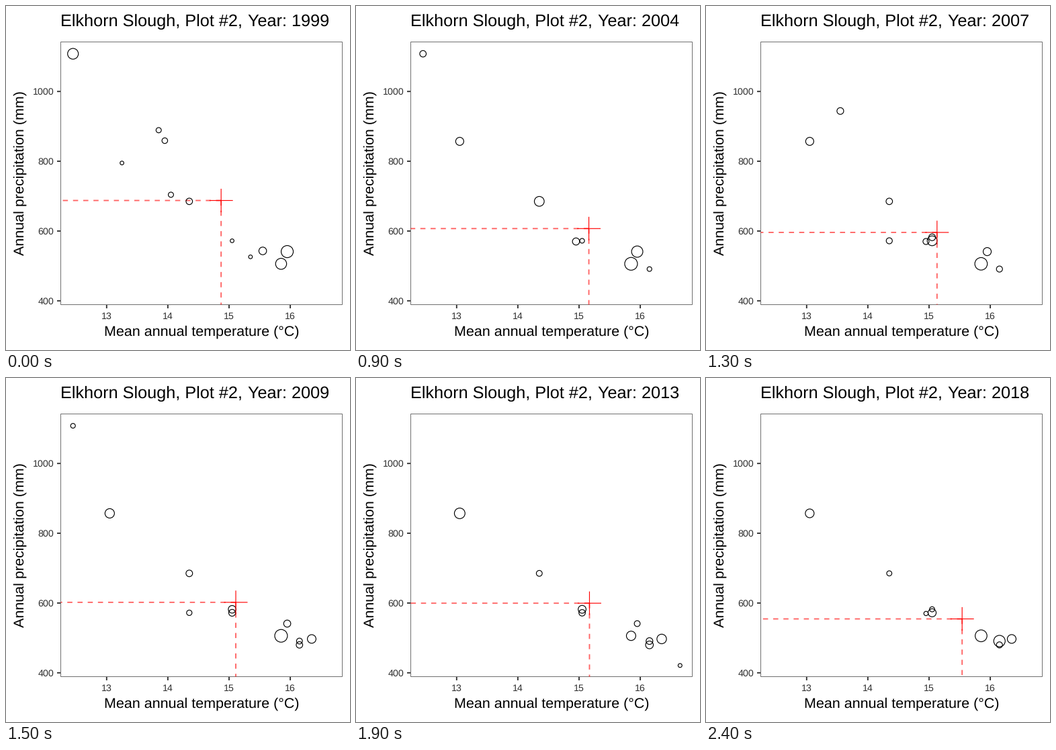
Recreate the animation shown at these times as a matplotlib script. Size 512 by 512 pixels, loop 3000 ms.

```python
import matplotlib.pyplot as plt
from matplotlib.animation import FuncAnimation
from matplotlib.patches import Circle, Rectangle

plt.rcParams["font.family"] = "Liberation Sans"
plt.rcParams["text.hinting"] = "none"

SIZE, DPI = 512, 100
PX = 72 / DPI  # points per pixel
LEFT, RIGHT, TOP, BOTTOM = 81.5, 500.5, 53.5, 444.5
DARK = "#333333"
LINE, STROKE, ARM = 1.9, 1.15, 17.5  # pixels

# Species niche: temperature (°C), precipitation (mm)
SPECIES = {
    "A": (12.45, 1108), "B": (13.05, 857), "C": (13.25, 795),
    "D": (13.45, 909), "E": (13.55, 944), "F": (13.85, 889),
    "G": (13.95, 859), "H": (14.05, 704), "I": (14.35, 685),
    "J": (14.35, 572), "K": (14.95, 570), "L": (15.05, 582),
    "M": (15.05, 572), "N": (15.35, 526), "O": (15.55, 543),
    "P": (15.95, 541), "Q": (15.85, 506), "R": (16.15, 491),
    "S": (16.15, 480), "T": (16.35, 497), "U": (16.65, 421),
}

# Step: (community mean, circle radius of each species present)
SURVEYS = {
    0: ((14.87, 687.5), dict(A=8, C=2.8, F=3.9, G=4.2, H=3.9, I=4.8,
                             M=2.8, N=2.8, O=5.7, P=9, Q=8.2)),
    1: ((14.83, 683), dict(A=8.5, D=3.5, G=3.5, I=3.5, J=4.2, P=5, Q=11.5)),
    4: ((15.16, 607), dict(A=4.8, B=6, I=7.3, K=5.3, M=3.5, P=8.4,
                           Q=9.5, R=3.5)),
    7: ((15.34, 581), dict(A=4.8, B=6, I=5, K=4.8, M=5.5, P=7, Q=9.3, R=4)),
    8: ((15.13, 596), dict(B=6, E=5, I=4.8, J=4.5, K=4.5, L=5, M=7.3,
                           P=6, Q=9.3, R=4.5)),
    12: ((15.09, 608), dict(A=3.5, B=8, I=5, J=3.5, L=6.3, M=2.8, P=4.5,
                            Q=9.6, R=4.2, S=4.8, T=6.4)),
    16: ((15.25, 591), dict(B=7.8, I=3.7, L=5.4, M=6.8, P=4.2, Q=4.3,
                            R=5.8, S=6.7, T=7.8, U=2.9)),
    19: ((15.54, 554.5), dict(B=6.5, I=3.8, K=3.2, L=3.8, M=6, Q=8.8,
                              R=8.5, S=4.5, T=6.5)),
}


def to_px(temp, precip):
    return 149.8 + (temp - 13) * 91.1, 127.2 + (1000 - precip) * 0.5193


def survey(step):
    """Mean and radii at a step, blended between the nearest surveys."""
    start = max(k for k in SURVEYS if k <= step)
    end = min(k for k in SURVEYS if k >= step)
    t = (step - start) / max(end - start, 1)
    (mean_a, radii_a), (mean_b, radii_b) = SURVEYS[start], SURVEYS[end]
    mean = [a + (b - a) * t for a, b in zip(mean_a, mean_b)]
    nearest = radii_a if t < 0.5 else radii_b
    radii = {}
    for name, r in nearest.items():
        a, b = radii_a.get(name, r), radii_b.get(name, r)
        radii[name] = a + (b - a) * t
    return mean, radii


def year_at(step):
    # no survey in 2003
    return 1999 + step + (4 <= step <= 6)


fig = plt.figure(figsize=(SIZE / DPI, SIZE / DPI), dpi=DPI, facecolor="white")
ax = fig.add_axes([0, 0, 1, 1])
ax.set(xlim=(0, SIZE), ylim=(SIZE, 0))
ax.axis("off")


def text(x, y, s, pixels, ha="left", color="black", rotation=0):
    return ax.text(x, y, s, fontsize=pixels * PX, ha=ha, va="baseline",
                   color=color, rotation=rotation, rotation_mode="anchor")


def line(xs, ys, color, width, **style):
    return ax.plot(xs, ys, color=color, lw=width * PX,
                   solid_capstyle="butt", snap=False, **style)[0]


ax.add_patch(Rectangle((LEFT, TOP), RIGHT - LEFT, BOTTOM - TOP, fill=False,
                       ec="#707070", lw=PX, snap=False))
for temp in range(13, 17):
    x = to_px(temp, 0)[0]
    line([x, x], [445, 450], DARK, LINE)
    text(x, 466, str(temp), 14.2, "center", "#303030")
for precip in range(400, 1001, 200):
    y = to_px(0, precip)[1]
    line([76, 81], [y, y], DARK, LINE)
    text(71.5, y + 5, str(precip), 14.2, "right", "#303030")

text(291, 491, "Mean annual temperature (°C)", 21.5, "center")
text(27, 248.5, "Annual precipitation (mm)", 21.5, "center", rotation=90)
text(81, 30, "Elkhorn Slough, Plot #2,", 25.2)
year_label = text(360.5, 30, "", 25.2)

circles = {}
for name, niche in SPECIES.items():
    circles[name] = ax.add_patch(
        Circle(to_px(*niche), 1, fill=False, ec="black", lw=STROKE * PX,
               zorder=3))

guide = dict(alpha=0.6, linestyle=(0, (4, 4)))
guide_x = line([], [], "red", LINE, **guide)
guide_y = line([], [], "red", LINE, **guide)
cross_x = line([], [], "red", STROKE, zorder=4)
cross_y = line([], [], "red", STROKE, zorder=4)


def update(frame):
    step = min(max(frame - 5, 0), 19)
    mean, radii = survey(step)
    x, y = to_px(*mean)
    year_label.set_text(f"Year: {year_at(step)}")
    for name, circle in circles.items():
        circle.set_visible(name in radii)
        circle.set_radius(radii.get(name, 1))
    # dashes run outward from the mean to the axes
    guide_x.set_data([x, LEFT], [y, y])
    guide_y.set_data([x, x], [y, BOTTOM])
    cross_x.set_data([x - ARM, x + ARM], [y, y])
    cross_y.set_data([x, x], [y - ARM, y + ARM])


anim = FuncAnimation(fig, update, frames=30, interval=100, repeat=True,
                     repeat_delay=0)
plt.show()
```
